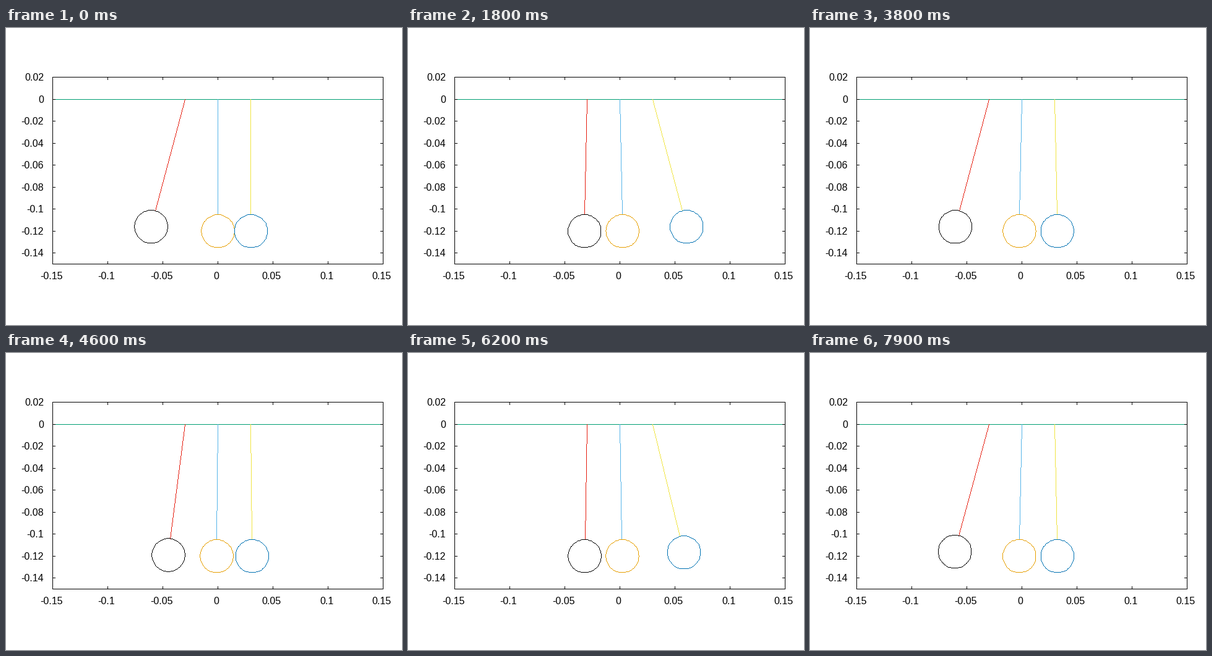
Animation, 640 px wide and 480 px high, one loop 8 s. Source, as a matplotlib script:

```python
import numpy as np
import matplotlib.pyplot as plt
from matplotlib.animation import FuncAnimation
from matplotlib.colors import to_rgb

W, H, DPI = 640, 480, 100
LEFT, RIGHT, TOP, BOTTOM = 75, 609, 79, 381

LENGTH, RADIUS = 0.12, 0.015
REACH = LENGTH - RADIUS
PIVOTS = (-0.03, 0.0, 0.03)
BALL_COLORS = ("#000000", "#e69f00", "#0072b2")
STRING_COLORS = ("#e51e10", "#56b4e9", "#f0e442")
ZERO_COLOR = "#009e73"

SWING = 2.008                      # half a period, s
LEAD = 0.1                         # time since release at the first frame, s
START, FULL = np.radians(15), 0.261
RECOIL, DRIFT = 0.0181, 0.0199     # small leftovers of each collision

FRAMES, STEP = 80, 100


def px(x):
    return LEFT + (x + 0.15) / 0.3 * (RIGHT - LEFT)


def py(y):
    return BOTTOM - (y + 0.15) / 0.17 * (BOTTOM - TOP)


def snap(v):
    return np.floor(np.asarray(v) + 0.5).astype(int)


def angles(t):
    """Angles of the three pendulums; the swing changes sides at each hit."""
    phase = (t + LEAD) / SWING
    hits = int(np.floor(phase + 0.5))
    swing = np.cos(np.pi * (phase - hits))
    if hits == 0:
        return -START * swing, 0.0, 0.0
    if hits % 2:
        return -RECOIL * swing, DRIFT * swing, FULL * swing
    return -FULL * swing, -DRIFT * swing, RECOIL * swing


def polyline(canvas, xs, ys, color="black"):
    """Draw a one-pixel line without smoothing between rounded vertices."""
    xs, ys = snap(xs), snap(ys)
    rgb = snap(np.array(to_rgb(color)) * 255)
    for x0, y0, x1, y1 in zip(xs, ys, xs[1:], ys[1:]):
        n = max(abs(x1 - x0), abs(y1 - y0)) + 1
        canvas[snap(np.linspace(y0, y1, n)), snap(np.linspace(x0, x1, n))] = rgb


def draw_axes(canvas):
    zero = py(0)
    polyline(canvas, (LEFT, RIGHT), (zero, zero), ZERO_COLOR)
    polyline(canvas, (LEFT, RIGHT, RIGHT, LEFT, LEFT),
             (TOP, TOP, BOTTOM, BOTTOM, TOP))
    for value in X_TICKS:
        x = px(value)
        polyline(canvas, (x, x), (BOTTOM - 4, BOTTOM))
        polyline(canvas, (x, x), (TOP, TOP + 4))
    for value in Y_TICKS:
        y = py(value)
        polyline(canvas, (LEFT, LEFT + 4), (y, y))
        polyline(canvas, (RIGHT - 4, RIGHT), (y, y))


def label(x, y, value, align):
    fig.text(x / W, 1 - y / H, f"{value:g}", family="Liberation Sans",
             fontsize=16 * 72 / DPI, ha=align, va="baseline", color="black")


X_TICKS = [(i - 3) * 5 / 100 for i in range(7)]
Y_TICKS = [(1 - i) * 2 / 100 for i in range(9)]

fig = plt.figure(figsize=(W / DPI, H / DPI), dpi=DPI, facecolor="white")
backdrop = np.full((H, W, 3), 255, dtype=np.uint8)
draw_axes(backdrop)
picture = fig.figimage(backdrop, origin="upper")

for value in X_TICKS:
    label(snap(px(value)) - 2, 406, value, "center")
for value in Y_TICKS:
    label(61, snap(py(value)) + 6, value, "right")

turn = np.radians(np.arange(0, 361, 5))
radius = px(RADIUS) - px(0)
ring_x, ring_y = radius * np.cos(turn), radius * np.sin(turn)


def draw(n):
    canvas = backdrop.copy()
    for pivot, angle, ball, string in zip(
            PIVOTS, angles(n * STEP / 1000), BALL_COLORS, STRING_COLORS):
        s, c = np.sin(angle), np.cos(angle)
        polyline(canvas, (px(pivot), px(pivot + REACH * s)),
                 (py(0), py(-REACH * c)), string)
        polyline(canvas, px(pivot + LENGTH * s) + ring_x,
                 py(-LENGTH * c) + ring_y, ball)
    picture.set_data(canvas)
    return [picture]


anim = FuncAnimation(fig, draw, frames=FRAMES, interval=STEP,
                     repeat=True, repeat_delay=0, blit=False)
plt.show()
```
